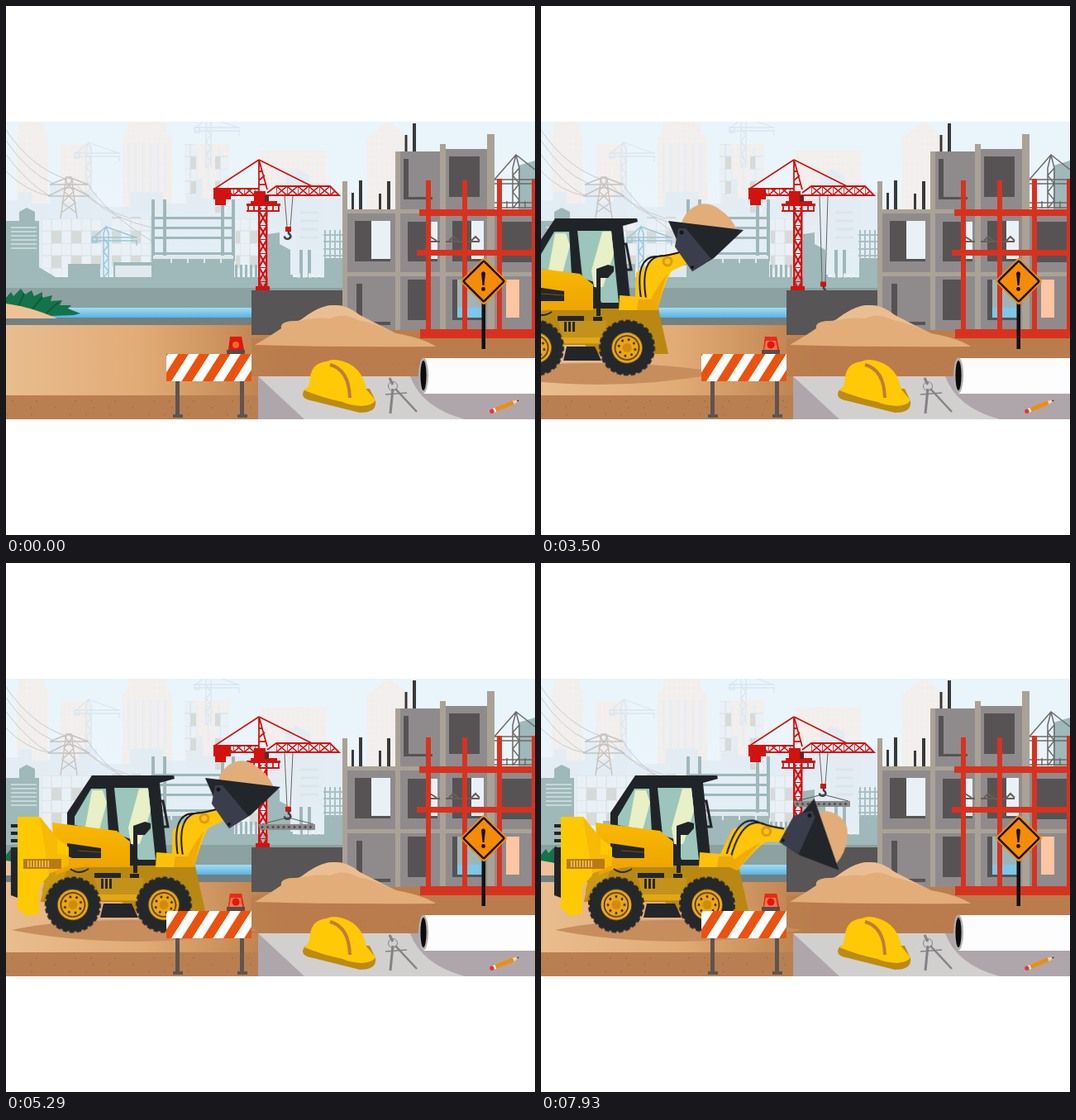
Recreate the animation shown at these times as an HTML page without scripts. Size 640 px wide and 640 px high, loop 8 s.

```html
<!DOCTYPE html>
<html lang="en">
<head>
<meta charset="utf-8">
<title>Construction site</title>
<style>
html, body { margin: 0; width: 100%; height: 100%; overflow: hidden; background: #fff; }
svg { display: block; width: 100%; height: 100%; }

.loader, .wheel, .arm, .bucket, .hook, .rope, .load, .glow { animation: 8s linear infinite; }
.loader { animation-name: drive; }
.wheel { animation-name: roll; }
.arm { animation-name: lower; transform-origin: 226px 368px; }
.bucket { animation-name: tip; transform-origin: 284.5px 303px; }
.hook { animation-name: hoist; }
.rope { animation-name: reel; transform-origin: 0 230px; }
.load { animation-name: attach; animation-timing-function: step-end; }
.glow { animation-name: blink; }

@keyframes drive {
  0% { transform: translateX(-365px); }
  18.75% { transform: translateX(-245px); }
  31.25% { transform: translateX(-167px); }
  43.75% { transform: translateX(-97px); }
  57.1% { transform: translateX(-37px); }
  65% { transform: translateX(-12px); }
  71% { transform: translateX(-2px); }
  75%, 100% { transform: none; }
}
@keyframes roll {
  0% { transform: rotate(-634deg); }
  18.75% { transform: rotate(-425deg); }
  31.25% { transform: rotate(-290deg); }
  43.75% { transform: rotate(-168deg); }
  57.1% { transform: rotate(-64deg); }
  65% { transform: rotate(-21deg); }
  71% { transform: rotate(-3.5deg); }
  75%, 100% { transform: rotate(0deg); }
}
@keyframes lower {
  0%, 66% { transform: rotate(0deg); animation-timing-function: ease-in; }
  77.6% { transform: rotate(2.5deg); }
  99.1% { transform: rotate(25deg); }
  100% { transform: rotate(25.6deg); }
}
@keyframes tip {
  0%, 66% { transform: rotate(0deg); animation-timing-function: ease-in; }
  77.6% { transform: rotate(6.5deg); }
  99.1% { transform: rotate(39deg); }
  100% { transform: rotate(40deg); }
}
@keyframes hoist {
  0% { transform: none; animation-timing-function: cubic-bezier(.37, 0, .63, 1); }
  41.25% { transform: translateY(67px); animation-timing-function: cubic-bezier(.37, 0, .63, 1); }
  86.25%, 100% { transform: none; }
}
@keyframes reel {
  0% { transform: scaleY(1); animation-timing-function: cubic-bezier(.37, 0, .63, 1); }
  41.25% { transform: scaleY(2.81); animation-timing-function: cubic-bezier(.37, 0, .63, 1); }
  86.25%, 100% { transform: scaleY(1); }
}
@keyframes attach { 0% { opacity: 0; } 41.25%, 100% { opacity: 1; } }
@keyframes blink {
  0%, 11.4%, 22.8%, 34.3%, 45.7%, 57.1%, 68.5%, 80%, 91.4% { opacity: 0; }
  6.5%, 9.5%, 17.9%, 20.9%, 29.3%, 32.3%, 40.8%, 43.8%, 52.2%, 55.2%,
  63.6%, 66.6%, 75%, 78%, 86.5%, 89.5%, 97.9%, 100% { opacity: 1; }
}
</style>
</head>
<body>
<svg viewBox="0 0 640 640">
<defs>
  <clipPath id="view"><path d="M0 140h640v360H0z"/></clipPath>
  <linearGradient id="sky" x2="0" y2="1"><stop stop-color="#e9f4fb"/><stop offset="1" stop-color="#eef6fb"/></linearGradient>
  <linearGradient id="water" x2="0" y2="1"><stop stop-color="#a5dcf3"/><stop offset="1" stop-color="#58b4e2"/></linearGradient>
  <linearGradient id="earth" gradientUnits="userSpaceOnUse" x2="330">
    <stop stop-color="#e9bd8e"/><stop offset=".5" stop-color="#e1ab76"/><stop offset=".75" stop-color="#cf9661"/><stop offset="1" stop-color="#bb7d4b"/>
  </linearGradient>
  <linearGradient id="hood" x2="0" y2="1"><stop stop-color="#f9b900"/><stop offset="1" stop-color="#eda100"/></linearGradient>
  <pattern id="tiles" width="24" height="30" patternUnits="userSpaceOnUse" x="43" y="257">
    <path d="M0 0h24v30H0z" fill="#eaf1f6"/>
    <path d="M12 15h12v15H12z" fill="#d6dad8"/>
    <path d="M0 0h24M0 15h24M0 0v30M12 0v30" stroke="#d7e0e5"/>
  </pattern>
  <pattern id="panes" width="6" height="8" patternUnits="userSpaceOnUse">
    <path d="M0 0h6v8H0z" fill="#f3efed"/><path d="M0 7h6M5 0v8" stroke="#efeeee"/>
  </pattern>
  <pattern id="mast" width="10" height="17" patternUnits="userSpaceOnUse" x="306" y="248">
    <path d="M0 0L10 17M10 0L0 17M0 0h10" stroke="#d2120f" stroke-width="2.2"/>
  </pattern>
  <pattern id="jib" width="13" height="11" patternUnits="userSpaceOnUse" x="327" y="218">
    <path d="M0 11L13 0M0 0L13 11M0 0v11" fill="none" stroke="#d2120f" stroke-width="1.5"/>
  </pattern>
  <pattern id="stripes" width="25.2" height="33" patternUnits="userSpaceOnUse" patternTransform="translate(221 421) skewX(-32.5)">
    <path d="M0 0h26v33H0z" fill="#e9530f"/><path d="M0 0h12.500v33H0z" fill="#fff"/>
  </pattern>
  <g id="thin-crane" fill="none">
    <path d="M-3 62V8L0 0L3 8V62M-3 62l6-8l-6-8l6-8l-6-8l6-8l-6-8M-17 13H38M-17 17H38M-15 13L0 0L36 13"/>
    <path d="M-17 13h6v6h-6zM37 17v6"/>
  </g>
  <g id="wheel">
    <circle r="32.500" fill="#25282b"/>
    <circle r="32.500" fill="none" stroke="#25282b" stroke-width="3" pathLength="48" stroke-dasharray="1.3 .7"/>
    <circle r="18.500" fill="#eea616"/>
    <circle r="14.500" fill="none" stroke="#3a2e14" stroke-width="1.5"/>
    <circle r="10" fill="none" stroke="#2a2a28" stroke-width="3" stroke-linecap="round" pathLength="8" stroke-dasharray="0 1"/>
    <circle r="5.500" fill="#cf8b0b"/>
  </g>
</defs>

<g clip-path="url(#view)">
  <path d="M0 140h640v232H0z" fill="url(#sky)"/>

  <!-- far city -->
  <g fill="url(#panes)">
    <path d="M13 153h3v-13h31v13h4v105H13zM66 168h38v90H66zM141 160l7-8v-12h46v12l7 8v90h-60zM216 167h54v80h-54zM308 175h80v90h-80zM437 160l26-21l26 21v90h-52z"/>
  </g>
  <path d="M148 166v60M157 166v60M166 166v60M175 166v60M184 166v60M193 166v60M230 172v50M245 172v50M258 172v50" stroke="#e7edf3" stroke-width="3"/>
  <path d="M0 235h15v-10h16v14h22v-22h15v20h20v-12h22v18h40v-18h40v14h28v-30h20v24h45v-10h55v-18l13-8l17 8v20h40v100H0z" fill="#e2edf5" opacity=".85"/>
  <path d="M350 244q16-16 33 0v50h-33z" fill="#e4ecf3"/>
  <path d="M356 250h22M356 260h22M356 270h22M356 280h22" stroke="#d9e5ee" stroke-width="3"/>
  <use href="#thin-crane" x="100" y="165" stroke="#dbe6f0" stroke-width="1.3"/>
  <use href="#thin-crane" x="245" y="134" stroke="#dbe6f0" stroke-width="1.3"/>
  <path d="M43 257h73v70H43zM128 255h50v60h-50zM216 167h14v62h-14zM253 180h15v70h-15zM278 257h28v60h-28z" fill="url(#tiles)"/>

  <!-- pylon and cables -->
  <g fill="none" stroke="#c9cbce" stroke-width="1">
    <path d="M0 150Q30 195 74 210M0 163Q28 203 56 214M0 180Q28 217 54 230M0 200Q25 225 54 230M98 214Q120 250 176 284M98 230Q130 258 176 268M76 208Q110 245 150 257"/>
    <path d="M66 257L73 207h6l7 50M53 216l20-8h6l20 8zM51 230l20-10h10l20 10zM67 250l17-12l-14-14l11-14M85 250l-17-12l14-14l-11-14" stroke="#c5c3c2" stroke-width="1.4"/>
  </g>

  <!-- near skyline -->
  <g fill="#9fb8ba">
    <path d="M0 260h16v-11l9-5l10 5v11h5v56l20 12h15v-16h39v16h16v-18h46v-6h100v24h41v-52l14-2v14l13 7v30h3v18h-3v20H0z"/>
    <path d="M345 328h63v14h-63z"/>
    <path d="M176 234h4v75h-4zM190 234h4v75h-4zM260 234h4v75h-4zM273 234h4v75h-4zM178 255h97v3h-97zM178 267h97v3h-97zM178 279h97v3h-97zM178 298h97v3h-97zM355 295h4v35h-4zM365 295h4v35h-4zM385 305h23v36h-23z"/>
    <path d="M277 313h3v15h-3zM283 313h3v15h-3zM289 313h3v15h-3zM295 313h3v15h-3zM301 313h3v15h-3z"/>
  </g>
  <path d="M6 268h31M6 273h31M6 278h31M6 283h31M6 288h31M6 293h31" stroke="#d2e2e5" stroke-width="1.5"/>
  <path d="M132 314h44v14h-44z" fill="#dfe9ee"/>
  <path d="M179 303h95v2h-95zM200 306v5M220 306v5M240 306v5M260 306v5" stroke="#dfe9ee" stroke-width="2"/>
  <path d="M386 271v36M392 271v36M398 271v36M404 271v36M384 277h24M384 285h24M384 294h24M384 302h24" stroke="#a9c0c2" stroke-width="2"/>
  <path d="M352 326h34" stroke="#e4eff2" stroke-width="5" stroke-dasharray="4 3"/>
  <use href="#thin-crane" x="121" y="267" stroke="#9ac6d8" stroke-width="1.400"/>

  <!-- shore -->
  <path d="M0 341h640v25H0z" fill="#8ba2a0"/>
  <path d="M0 365h640v12H0z" fill="url(#water)"/>
  <path d="M0 377h640v10H0z" fill="#6f8183"/>
  <path d="M0 386h640v114H0z" fill="url(#earth)"/>
  <path d="M0 471h310v29H0z" fill="#ba7f50"/>
  <path d="M0 377V353l6-7l3 5l9-9l5 7l8-5l3 7l10-5v7l12-3l-2 7l14-1l-3 6l14 0l-4 4l15 6l-8 2z" fill="#14734a"/>
  <path d="M10 374L22 348M25 375L44 352M45 375L64 358" stroke="#0e5c3b" stroke-width="2"/>
  <path d="M0 360q30 4 62 18H0z" fill="#efc197"/>
  <g fill="none" stroke="#8f5a33" stroke-linecap="round" stroke-width="1.3" stroke-dasharray="0 29 0 47 0 19">
    <path d="M8 478H300M30 486H300M2 494H300M320 419H640M400 433H640M310 441H640"/>
  </g>

  <!-- tower crane -->
  <g fill="#d2120f">
    <path d="M306 244h10v98h-10z" fill="url(#mast)"/>
    <path d="M305 240h2.500v102h-2.500zM314 240h2.500v102h-2.500zM302 339h17v5h-17z"/>
    <path d="M327 218h65l11 11h-76zM272 220h34v10h-34z" fill="url(#jib)"/>
    <path d="M251 221h21v13h-6v7h-13v-7h-2zM300 224h14v16h-14zM291 239h41v3h-41zM296 236h32v3h-32z"/>
    <path d="M306 186L251 222M306 186L370 218M306 186L316 222M306 186V226M306 200l4 0M306 211l7-6M306 216l8 0M251 221h55M251 229h152l-11-11h-65l-11 8M293 241v7M300 241v7M323 241v7M330 241v7M291 248h40" fill="none" stroke="#d2120f" stroke-width="1.800"/>
    <path d="M313 229h5v8h-5z" fill="#5b2a2a"/>
  </g>

  <path class="rope" d="M337 230L340 267M347 230L344 267" stroke="#6a6462" vector-effect="non-scaling-stroke"/>
  <g class="hook">
    <g class="load">
      <path d="M309 288L341 280L372 288" fill="none" stroke="#5d5a5a"/>
      <path d="M305 288h69v7h-66z" fill="#8b898a"/>
      <path d="M310 291.5h62" stroke="#4d4a4b" stroke-width="3" stroke-linecap="round" stroke-dasharray="0 6.5"/>
    </g>
    <path d="M338 267h7v6h-7z" fill="#d2120f"/>
    <path d="M342 272v3q5 4 0 6.500q-5 1-5-3" fill="none" stroke="#453f3f" stroke-width="2.6"/>
  </g>

  <!-- building -->
  <path d="M620 193l20-6v60h-20z" fill="#9fb8ba"/>
  <g fill="none" stroke="#6d6a6a" stroke-width="1.5">
    <path d="M613 245V196l4-16l4 16v49M613 245l8-10l-8-10l8-10l-8-10l8-9M590 210h50M590 215h50M590 211L617 180L640 198M590 238h46M590 244h46M596 236v9M606 236v9M628 236v9"/>
  </g>
  <path d="M297 344h111v54H297z" fill="#575556"/>
  <path d="M297 402h343v46H297z" fill="#ba7d4c" opacity=".75"/>
  <path d="M477 176h48v70h-48zM532 173h51v73h-51zM413 249h227v143H413z" fill="#8f8b8c"/>
  <g fill="#575354">
    <path d="M481 185h6v46h29v3h-35zM536 182h37v49h-37zM422 260h43v49h-43zM486 261h36v48h-36zM540 260h38v49h-38zM599 261h37v49h-37zM424 336h7v46h34v4h-41zM486 331h22v49h-22zM540 331h38v49h-38z"/>
    <path d="M418 226h3v22h-3zM427 211h4v37h-4zM451 227h3v21h-3zM461 212h4v36h-4zM482.500 156h3v20h-3zM492 142h4v34h-4z" fill="#3a3838"/>
  </g>
  <path d="M442 260h23v46h-23zM513 261h9v45h-9zM563 260h15v46h-15z" fill="#e9f1f7"/>
  <path d="M546 331h32v34h-32z" fill="#9db5b6"/>
  <path d="M546 365h32v12h-32z" fill="#7cc7ea"/>
  <path d="M605 331h16v46h-16z" fill="#fdc5a1"/>
  <path d="M513 279l8 5M536 284l5-5l6 5M563 284l5-5l5 5M513 285h60" fill="none" stroke="#6a5d58" stroke-width="2"/>
  <g fill="#aaa296">
    <path d="M407 212h6v183h-6zM471 176h6v216h-6zM525 167h7v225h-7zM582 155h9v237h-9zM413 246h100v5H413zM413 322h227v5H413z"/>
  </g>
  <g fill="#d8321f">
    <path d="M508 211h6v185h-6zM552 211h6v185h-6zM594 209h6v187h-6zM636 209h4v187h-4zM500 246h140v8H500zM497 295h143v7H497zM501 391h139v11H501z"/>
  </g>

  <!-- sand heap -->
  <path d="M301 410Q320 399 333 390Q331 382 347 381Q357 382 365 374Q384 361 397 362Q412 361 428 374L472 396Q505 402 520 412Q400 413 301 410z" fill="#e2ad78"/>
  <path d="M355 381Q380 361 397 362Q412 361 428 374L466 394Q441 382 426 380Q408 370 392 378Q373 376 355 381z" fill="#ebbe92"/>

  <!-- sign -->
  <path d="M575.500 358h4.500v57h-4.500z" fill="#111"/>
  <g transform="translate(578 333) rotate(45)">
    <rect x="-20.500" y="-20.500" width="41" height="41" rx="2.500" fill="#f68b08"/>
    <rect x="-17.500" y="-17.500" width="35" height="35" rx="1.500" fill="none" stroke="#15110c" stroke-width="2.500"/>
  </g>
  <path d="M575 323q2.500-3.500 5 0l-1.500 15h-2z" fill="#15110c"/>
  <circle cx="577.500" cy="342.500" r="2.400" fill="#15110c"/>

  <!-- drawing table -->
  <path d="M305 448h335v52H305z" fill="#d2cfcf"/>
  <path d="M305 448L361 500H305zM489 448q14 38 66 52h85v-52z" fill="#afa6ab"/>
  <path d="M505 426h135v43H505z" fill="#fdfdfd"/>
  <ellipse cx="505" cy="447" rx="6" ry="21.500" fill="#b2afb0"/>
  <ellipse cx="505" cy="447" rx="3.600" ry="18" fill="#0c0c0c"/>
  <path d="M359 470Q359 464 366 462L440 463L447 478Q449 492 428 492L372 478Q359 476 359 470z" fill="#bd8b12"/>
  <path d="M361 465Q367 462 368 449Q370 432 388 430Q396 426 408 430Q431 437 436 464L447 477Q444 483 430 484Q415 483 407 479Q383 474 361 465z" fill="#ffc905"/>
  <path d="M392 434Q415 440 416 474" fill="none" stroke="#bf7c3c" stroke-width="4"/>
  <g fill="none" stroke="#848284">
    <path d="M464 450l4 8M468 463L465 493" stroke-width="3"/>
    <path d="M471 463L497 491" stroke-width="2.500"/>
    <path d="M459 470l26-2" stroke-width="1.500"/>
    <circle cx="468" cy="460" r="5.500"/>
  </g>
  <g transform="translate(586 491) rotate(-22)">
    <path d="M5-2.500h25v5H5z" fill="#f28c0a"/>
    <path d="M30-2.500L38 0L30 2.500z" fill="#f6d6ae"/>
    <path d="M35-1L38 0L35 1z" fill="#222"/>
    <path d="M4-2.500h3v5H4z" fill="#eee"/>
    <circle cx="2" r="2.700" fill="#e5343c"/>
  </g>

  <!-- loader -->
  <g class="loader">
    <path d="M17 444Q75 431 166 432Q260 433 316 444Q240 458 166 458Q80 457 17 444z" fill="#c78d5c"/>
    <path d="M24 316h-8v4h8v5h-8v4h8v5h-8v4h8v6h-8v58l8 3z" fill="#212428"/>
    <path d="M62 362H238L251 421H160L150 410H52z" fill="#b88813"/>
    <path d="M62 366h24l-6 16q-20 5-26 30V395z" fill="#c99a16"/>
    <path d="M117 381h60l-6 28h-46z" fill="#c3921a"/>
    <path d="M120 401h52v7h-52z" fill="#e2a716"/>
    <path d="M128 412h34l8 17h-46z" fill="#22252a"/>

    <!-- cab -->
    <path d="M108 266L114 257H213L214 261L196 266L206 366H160L159 336L84 319V302z" fill="#202428"/>
    <path d="M113 273h18l3 53l-41-9v-10z" fill="#9cc6bb"/>
    <path d="M114 275h13l5 15l-9 33l-17-4z" fill="#e9efc6"/>
    <path d="M141 272h41l9 87h-21l-9-25l-14-5z" fill="#9cc6bb"/>
    <path d="M171 273h11l3 27l-13 40h-11l-3-20z" fill="#e9efc6"/>
    <path d="M194 288h6l6 31h-8" fill="none" stroke="#202428" stroke-width="3"/>

    <path d="M66 314L144 324L160 337V368H112Q95 366 70 378z" fill="url(#hood)"/>
    <path d="M84 339L125 345V357H90L84 354z" fill="#24262a"/>
    <path d="M97 348l28 2" stroke="#6e5616"/>
    <path d="M24 307H51L72 333L86 344V354L62 366V378L50 392V424L36 427L24 418z" fill="#ffc902"/>
    <path d="M51 307L72 333V352L86 354V366L62 376z" fill="#f7ba05"/>
    <path d="M31 358h46v12H31z" fill="#b9791a"/>
    <path d="M36 364h26" stroke="#f3cb55" stroke-width="8" stroke-dasharray="1.500 2"/>
    <path d="M88 370q10 8 22 0" fill="none" stroke="#24262a" stroke-width="2"/>
    <path d="M117 375h32v6h-32zM125 382h3v12h-3zM130 382h3v12h-3zM135 382h3v12h-3z" fill="#24262a"/>
    <path d="M164 318l14-5l7 2v6l-7 8h-9v46h-5zM160 376h11v5h-11z" fill="#202428"/>

    <g class="arm">
      <path d="M211 367V350L212 323L232 308Q240 301 252 300L270 296L282 298L280 309L256 320Q250 324 238 367z" fill="#ffc50b"/>
      <path d="M250 324Q244 338 238 367H224Q236 340 250 324z" fill="#f2aa06"/>
      <circle cx="250" cy="309" r="6.500" fill="#dc9b09"/>
      <circle cx="250" cy="309" r="3.500" fill="#f8bf20"/>
      <path d="M218 354Q210 302 238 303Q252 302 268 297M224 354Q216 304 244 302" fill="none" stroke="#16181b" stroke-width="2"/>
      <g class="bucket">
        <path d="M266 264Q274 243 290 240Q301 237 313 246Q327 255 334 271z" fill="#e2ad78"/>
        <path d="M251 260L342 271L306 305L280 321L259 291L262 285z" fill="#22252a"/>
        <path d="M263 269L272 269L303 306L280 321L259 291z" fill="#3a3e4c"/>
        <g fill="#14161a"><circle cx="267" cy="274" r="2.500"/><circle cx="280" cy="316" r="2"/></g>
      </g>
    </g>

    <path d="M192 350L230 353L238 368H191z" fill="#ffc10a"/>
    <path d="M215 355h17l6 13h-25z" fill="#eda908"/>
    <g transform="translate(91 413.500)"><use class="wheel" href="#wheel"/></g>
    <g transform="translate(201 413.500)"><use class="wheel" href="#wheel"/></g>
  </g>

  <!-- barrier -->
  <path d="M205 454h5v40h4v4h-12v-4h3zM283 454h5v40h4v4h-12v-4h3z" fill="#5c5552"/>
  <path d="M194 421h103v33H194z" fill="url(#stripes)"/>
  <path d="M267 416h22v5h-22z" fill="#5b4b47"/>
  <path d="M271 400h14l3 16h-19z" fill="#e0170f"/>
  <circle cx="278" cy="410" r="4" fill="#ef6a21"/>
  <g class="glow">
    <path d="M271 400h14l3 16h-19z" fill="#ea2a18"/>
    <path d="M272 405h12l2 11h-16z" fill="#f9764a"/>
    <circle cx="278" cy="410" r="4.500" fill="#e0170f"/>
  </g>
</g>
</svg>
</body>
</html>
```
